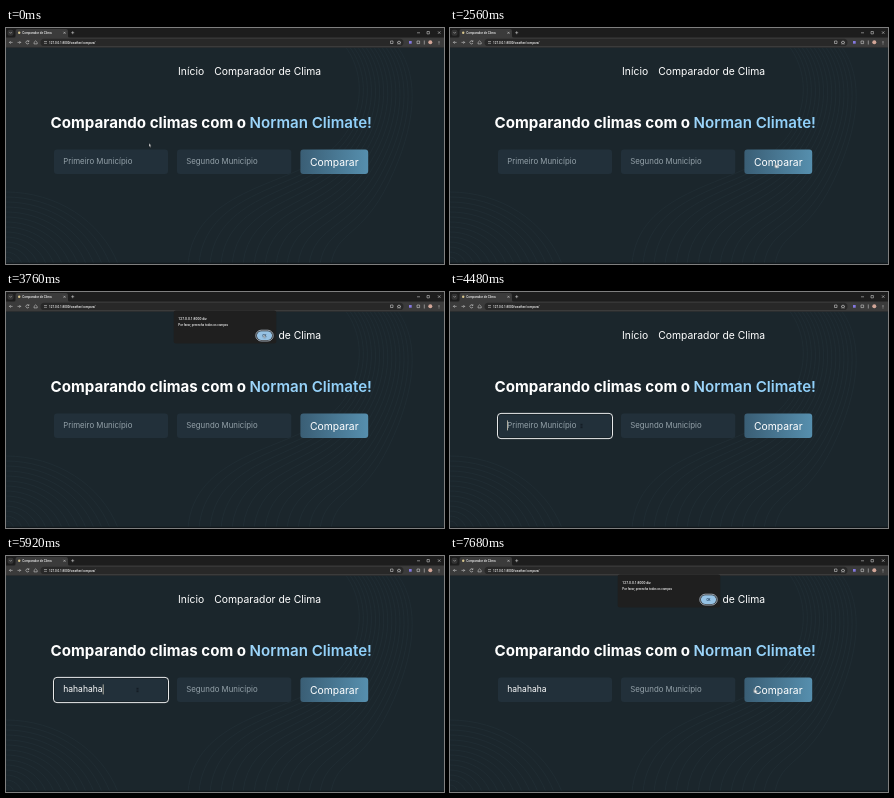
An HTML page that plays this animation: 438x236 px, repeating every 8000 ms.

```html
<!DOCTYPE html>
<html lang="pt-BR">
<head>
<meta charset="utf-8">
<title>Comparador de Clima</title>
<style>
  html, body { margin: 0; width: 100%; height: 100%; overflow: hidden; background: #1b262c; }
  svg { display: block; width: 100vw; height: 100vh; font-family: Inter, "Open Sans", sans-serif; }
  .nav { font-size: 10.35px; fill: #fff; }
  .title { font-size: 15.1px; font-weight: 700; fill: #fff; }
  .hint { font-size: 7.85px; fill: #93a0a8; }
  .typed { font-size: 8.5px; fill: #fff; }
  .field { fill: #22303a; }
  .tiny { font: 500 3px Roboto, sans-serif; fill: #efefef; }
  .icon { fill: none; stroke: #e2e2e2; stroke-width: .5; }
  .contours { fill: none; stroke: #27363f; stroke-width: .6; opacity: .65; }

  #focus, #caret, #alert, .arrow, .beam, .hand { animation: 8s step-end infinite; }
  #focus { animation-name: focus; }
  #caret { animation-name: caret; }
  #alert { animation-name: alert; }
  .arrow { animation-name: arrow; }
  .beam { animation-name: beam; }
  .hand { animation-name: hand; }
  #pointer { animation: travel 8s linear infinite; }

  @keyframes focus {
    0%, 31%, 86% { visibility: hidden; }
    14%, 56% { visibility: visible; }
  }
  @keyframes caret {
    0%, 20%, 31%, 78% { visibility: hidden; }
    14%, 26%, 56% { visibility: visible; }
  }
  @keyframes alert {
    0%, 49% { visibility: hidden; }
    38%, 90% { visibility: visible; }
  }
  @keyframes arrow {
    0%, 40%, 83% { visibility: visible; }
    10%, 52%, 85% { visibility: hidden; }
  }
  @keyframes beam {
    0%, 29%, 83% { visibility: hidden; }
    10%, 52% { visibility: visible; }
  }
  @keyframes hand {
    0%, 40% { visibility: hidden; }
    29%, 85% { visibility: visible; }
  }
  @keyframes travel {
    0%, 2.9% { transform: translate(143px, 115.5px); }
    3%, 6.9% { transform: translate(141px, 119px); }
    8%, 10.9% { transform: translate(137px, 124px); }
    14%, 26% { transform: translate(131.5px, 134px); }
    31% { transform: translate(324px, 135px); }
    32%, 40% { transform: translate(325.5px, 135.5px); }
    43%, 45% { transform: translate(298px, 92px); }
    47%, 48.9% { transform: translate(257.5px, 42.5px); }
    54%, 80% { transform: translate(131.5px, 134px); }
    82% { transform: translate(210px, 131px); }
    87%, 100% { transform: translate(304.5px, 132.5px); }
  }
</style>
</head>
<body>
<svg viewBox="0 0 438 236" preserveAspectRatio="none">
  <defs>
    <linearGradient id="sky"><stop stop-color="#b6e0fd"/><stop offset="1" stop-color="#8ecff9"/></linearGradient>
    <linearGradient id="steel"><stop stop-color="#3a5e75"/><stop offset="1" stop-color="#568fae"/></linearGradient>
  </defs>

  <rect width="438" height="236" fill="#1b262c"/>
  <path id="contours" class="contours"/>
  <rect y="234.7" width="438" height="1.3" fill="#11171b"/>

  <g id="browser">
    <rect width="438" height="19.5" fill="#1d1d1d"/>
    <path d="M0 9.5H8Q9.5 9.5 9.5 8V3Q9.5 1 11.5 1H60Q62 1 62 3V8Q62 9.5 63.5 9.5H438V19.5H0Z" fill="#3b3b3b"/>
    <rect x="1.5" y="1.8" width="6" height="6" rx="2" fill="#333"/>
    <path class="icon" d="M3.5 4.2l1.1 1.1 1.1-1.1M57.5 3.8l2 2m0-2l-2 2M65.2 4.7h3m-1.5-1.5v3M411 4.8h3M421 3.5h2.4v2.4H421zM432 3.4l2.4 2.4m0-2.4l-2.4 2.4"/>
    <circle cx="13.2" cy="4.8" r="1.2" fill="#d8c68d"/>
    <text class="tiny" x="16.3" y="5.9">Comparador de Clima</text>
    <rect x="34.5" y="10.7" width="363" height="7.4" rx="3.7" fill="#282828"/>
    <path class="icon" d="M6.6 14.4H3.4m1.3-1.3l-1.3 1.3 1.3 1.3M11.5 14.4h3.2m-1.3-1.3l1.3 1.3-1.3 1.3M22.8 13.4a1.6 1.6 0 1 0 .2 1.6M22.9 12.3v1.3h-1.3M28 14.4l1.6-1.5 1.6 1.5v1.5H28zM38 13.5h3M38 15.3h3M384.5 13h2.5v2.5h-2.5zM393 12.8l.6 1.2 1.3.1-1 .9.3 1.2-1.2-.7-1.2.7.3-1.2-1-.9 1.3-.1zM411 13h2.6v2.6H411zM418.3 12.5v4"/>
    <text class="tiny" x="43" y="15.6">127.0.0.1:8000/weather/compara/</text>
    <rect x="403" y="13" width="2.7" height="2.7" fill="#8478e0"/>
    <circle cx="424.3" cy="14.3" r="2" fill="#d3a698"/>
    <path d="M433 13v.7m0 .6v.7m0 .6v.7" stroke="#e2e2e2" stroke-width=".7"/>
  </g>

  <text class="nav" x="172.1" y="47.2">Início</text>
  <text class="nav" x="208.3" y="47.2">Comparador de Clima</text>
  <text class="title" x="44.6" y="99.5">Comparando climas com o <tspan font-weight="600" fill="url(#sky)">Norman Climate!</tspan></text>

  <rect class="field" x="48" y="121.5" width="114" height="24.6" rx="3"/>
  <rect class="field" x="171" y="121.5" width="114.3" height="24.6" rx="3"/>
  <rect x="294.4" y="121.5" width="67.8" height="24.6" rx="3" fill="url(#steel)"/>
  <g id="focus" fill="none">
    <rect x="48.4" y="122.3" width="113.2" height="23.4" rx="2.8" stroke="#151d22" stroke-width=".7"/>
    <rect x="47.5" y="121.4" width="115" height="25.2" rx="3.5" stroke="#fff" stroke-width=".9"/>
  </g>
  <text class="hint" id="hint" x="57.3" y="136.4">Primeiro Município</text>
  <text class="typed" id="typed" x="57.3" y="136.4"></text>
  <rect id="caret" x="57.3" y="128.4" width=".7" height="10" fill="#e8e0cb"/>
  <text class="hint" x="180.2" y="136.4">Segundo Município</text>
  <text class="nav" x="303.9" y="137.6">Comparar</text>

  <g id="alert">
    <rect x="167.7" y="18.5" width="102.6" height="33" rx="2" fill="#1f1f1f"/>
    <text class="tiny" x="172.3" y="27.8" style="font-size:3.4px">127.0.0.1:8000 diz</text>
    <text class="tiny" x="172.3" y="34.2">Por favor, preencha todos os campos</text>
    <rect x="249.8" y="38.2" width="17.4" height="10.8" rx="5.4" fill="none" stroke="#d5e3f3" stroke-width=".7"/>
    <rect x="250.9" y="39.3" width="15.2" height="8.6" rx="4.3" fill="#96c2e4"/>
    <text class="tiny" x="256.4" y="44.7" style="fill:#153250">OK</text>
  </g>

  <g id="pointer">
    <path class="arrow" d="M0 0V3.3l.8-.7.6 1.2.5-.3-.6-1.2h1.1Z" fill="#fff" stroke="#111" stroke-width=".25"/>
    <path class="beam" d="M-.7-1.7H.7M0-1.7V1.7M-.7 1.7H.7" fill="none" stroke="#080d11" stroke-width=".6"/>
    <path class="hand" d="M-.5.2q.5-.6 1 0V1.7l1.7.4q.5.2.4.8L2.3 4.4H.2L-1.2 2.7q.1-.6.7-.2Z" fill="#fff" stroke="#111" stroke-width=".25"/>
  </g>
</svg>
<script>
  const byId = id => document.getElementById(id);
  const hint = byId('hint'), typed = byId('typed'), caret = byId('caret');
  const LOOP = 8000, WORD = 'hahahaha', TYPE_START = 4960, KEY_TIME = 90, TEXT_X = 57.3;

  // A band sweeping from the upper right to the lower middle, and rings in the lower left corner.
  let lines = '';
  for (let i = 0; i < 14; i++) {
    lines += `M${340 + 4 * i} 19.5C${362 + 4 * i} 50 ${358 + 4 * i} 98 ${318 + 5 * i} ${128 + 2 * i}S${188 + 11 * i} ${163 + 3 * i} ${182 + 11 * i} 236`;
    const w = 112 - 8 * i, h = 72 - 5 * i;
    lines += `M0 ${236 - h}C${w * .45} ${236 - h} ${w * .85} ${236 - h * .6} ${w} 236`;
  }
  byId('contours').setAttribute('d', lines);

  const start = performance.now();
  function draw() {
    const time = (performance.now() - start) % LOOP;
    const count = Math.max(0, Math.min(WORD.length, Math.floor((time - TYPE_START) / KEY_TIME) + 1));
    if (typed.textContent.length !== count) {
      typed.textContent = WORD.slice(0, count);
      hint.style.visibility = count ? 'hidden' : 'visible';
      caret.setAttribute('x', TEXT_X + (count ? typed.getComputedTextLength() + .3 : 0));
    }
    requestAnimationFrame(draw);
  }
  draw();
</script>
</body>
</html>
```
